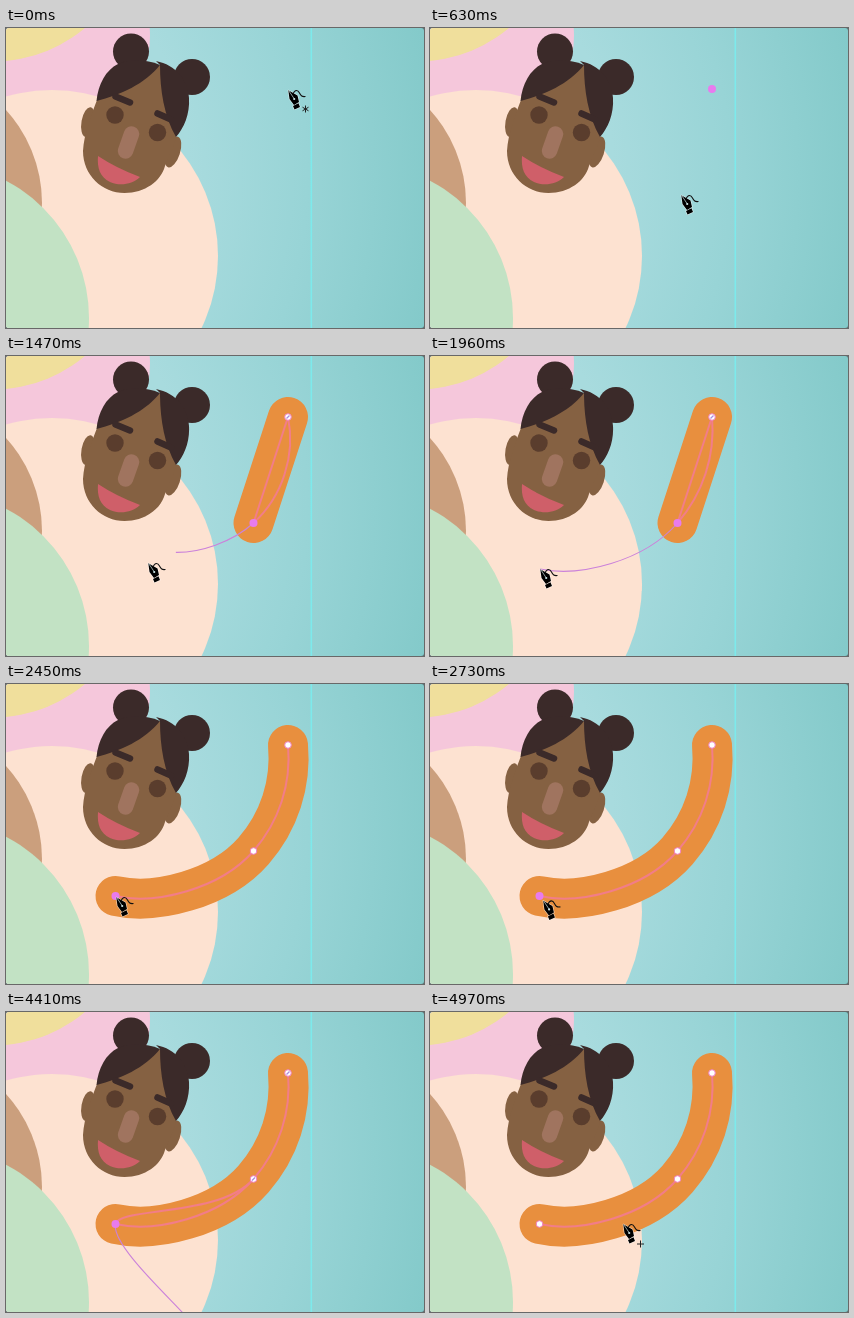
Recreate the animation shown at these times as an HTML page. Size 418x300 px, loop 5.04 s.

```html
<!DOCTYPE html>
<html lang="en">
<head>
<meta charset="utf-8">
<title>Drawing an arm with the curvature pen</title>
<style>
  html, body { margin: 0; width: 100%; height: 100%; overflow: hidden; background: #5b7375; }
  svg { display: block; width: 418px; height: 300px; border-radius: 3px; }
  .hair { fill: #3b2a29; }
  .skin { fill: #856142; }
  .eye { fill: #5a3d2d; }
  .brow { stroke: #3b2a29; stroke-width: 6.5; stroke-linecap: round; }
  .line { fill: none; stroke: #f27d88; stroke-width: 2; }
  .band { fill: none; stroke: #cb82da; stroke-width: 1.1; }
  #arm { fill: none; stroke: #e88f3e; stroke-width: 40; stroke-linecap: round; }
</style>
</head>
<body>
<svg viewBox="0 0 418 300">
  <defs>
    <radialGradient id="sea" gradientUnits="userSpaceOnUse" cx="-100" cy="150" r="535">
      <stop offset=".53" stop-color="#a8dbde"/>
      <stop offset=".75" stop-color="#98d4d6"/>
      <stop offset="1" stop-color="#84caca"/>
    </radialGradient>
  </defs>
  <rect width="418" height="300" fill="url(#sea)"/>
  <rect x="304.5" width="1.6" height="300" fill="#7deaec"/>

  <circle cx="46" cy="8" r="98" fill="#f5c7db"/>
  <circle cx="-13" cy="-109" r="142.600" fill="#f0df9c"/>
  <circle cx="46" cy="228" r="166" fill="#fde2d1"/>
  <circle cx="-102" cy="175" r="138" fill="#cb9f7d"/>
  <circle cx="-72" cy="290" r="155" fill="#c2e2c4"/>

  <g id="head">
    <circle class="hair" cx="125" cy="23.500" r="18"/>
    <circle class="hair" cx="186" cy="49" r="18"/>
    <ellipse class="skin" cx="82" cy="94" rx="6.500" ry="15" transform="rotate(10 82 94)"/>
    <ellipse class="skin" cx="167" cy="124" rx="7" ry="16" transform="rotate(18 167 124)"/>
    <path class="skin" d="M154 37C133 46 110 60 91 72C85 88 78 106 77 123C77 147 96 165 118.500 165C139 165 155 153 159 138C163 128 168 119 170 109C173 80 163 56 154 37Z"/>
    <path class="hair" d="M154 37C140 31 123 31 112 36C100 42 92 56 90.500 73C114 67 139 56 154 37Z"/>
    <path class="hair" d="M154 37C154 62 158 88 170 109C178 100 184 86 183 70C182 52 170 37 150 33Z"/>
    <path class="brow" d="M109.500 68.500L124 74.500M151.500 85.500L165 91.500"/>
    <circle class="eye" cx="109" cy="87" r="8.700"/>
    <circle class="eye" cx="151.500" cy="104.500" r="8.700"/>
    <path d="M125.500 106L119.500 123" stroke="#a0745f" stroke-width="15.500" stroke-linecap="round"/>
    <path d="M92 128Q110 140 134 149C126 157 113 158 104 154C94 149 91 140 92 128Z" fill="#cf5f69"/>
  </g>

  <path id="arm"/>
  <path id="spine" class="line"/>
  <path id="preview" class="line"/>
  <path id="band" class="band"/>
  <g id="nodes"></g>

  <g id="cursor">
    <path d="M.3.3L9.500 5.500L11 12L6 15L1.500 9ZM5 16L10.500 13.200L12 17L6.500 19.500Z" stroke="#fff" stroke-opacity=".65" stroke-width="1.200" paint-order="stroke" stroke-linejoin="round"/>
    <path d="M1 1L6 8.500" stroke="#cfe9ea" stroke-width=".7"/>
    <circle cx="6.200" cy="9" r="1.100" fill="#cfe9ea"/>
    <path d="M5 4C7-1 10 0 11.500 3S14 7 17.500 6.500" fill="none" stroke="#111" stroke-width="1.100"/>
    <g stroke="#222">
      <path id="plus" d="M14 20H21M17.500 16.500V23.500"/>
      <path id="star" d="M17.500 15.500V22.500M14.500 17.200L20.500 20.800M20.500 17.200L14.500 20.800"/>
    </g>
  </g>
</svg>

<script>
const LOOP = 5040, STEP = 70;
const CLICK = { first: 70, second: 980, third: 2310, cancel: 4620 };
const anchors = [[282, 61], [247.5, 167], [109.5, 212]];

// time, x, y, easing into this pose
const easeIn = p => p * p;
const easeOut = p => 1 - (1 - p) ** 2;
const smooth = p => p * p * (3 - 2 * p);
const route = [
  [0, 282, 62], [70, 282, 62], [630, 251, 167, smooth], [770, 247, 167, easeOut],
  [980, 247, 167], [1470, 142, 207, easeIn], [1820, 110, 213, easeOut],
  [2660, 110, 213], [3290, 195, 312, smooth], [4550, 185, 312],
  [4970, 193, 212, easeOut], [5040, 193, 212]
];

const $ = id => document.getElementById(id);
const add = (a, b, k = 1) => [a[0] + b[0] * k, a[1] + b[1] * k];
const sub = (a, b) => add(a, b, -1);
const dot = (a, b) => a[0] * b[0] + a[1] * b[1];
const size = v => Math.hypot(...v);
const unit = v => add([0, 0], v, 1 / (size(v) || 1));
const pt = p => p.map(n => n.toFixed(2)).join(' ');
const move = p => `M${pt(p)}`;
const cubic = (a, b, c) => `C${pt(a)} ${pt(b)} ${pt(c)}`;

function cursorAt(t) {
  const i = Math.max(1, route.findIndex(k => k[0] >= t));
  const [t0, x0, y0] = route[i - 1], [t1, x1, y1, ease = p => p] = route[i];
  const p = ease(Math.max(0, (t - t0) / (t1 - t0)));
  return [x0 + (x1 - x0) * p, y0 + (y1 - y0) * p];
}

// Direction of a smooth curve at b, close to the circle through a, b, c
function tangent(a, b, c) {
  const u = sub(b, a), v = sub(c, b);
  return unit(add(add([0, 0], unit(u), size(v)), unit(v), size(u)));
}

const mirror = (dir, chord) => sub(add([0, 0], chord, 2 * dot(chord, dir)), dir);

// Two arcs joined at b
function arcs(a, b, c) {
  const t = tangent(a, b, c), u = sub(b, a), v = sub(c, b);
  const du = size(u) * 0.35, dv = size(v);
  return [
    cubic(add(a, mirror(t, unit(u)), du), add(b, t, -du), b),
    cubic(add(b, t, dv * 0.35), add(c, mirror(t, unit(v)), -dv * 0.28), c)
  ];
}

// Preview of the last arc and the loose end beyond it
function tail(a, b, c, end) {
  const t1 = tangent(a, b, c), t2 = tangent(b, c, end);
  const d = size(sub(c, b)), v = sub(end, c);
  return [
    cubic(add(b, t1, d * 0.35), add(c, t2, -d * 0.12), c),
    cubic(add(c, t2, size(v) * 0.18), add(end, v, -0.2), end)
  ];
}

function node(p, chosen, marked) {
  const [x, y] = p;
  if (chosen) return `<circle cx="${x}" cy="${y}" r="4" fill="#e87bee"/>`;
  const mark = marked
    ? `<path d="M${x - 1.5} ${y + 1.5}l3-3" stroke="#a98be0" stroke-width="1.3"/>` : '';
  return `<circle cx="${x}" cy="${y}" r="3.3" fill="#fff" stroke="#ee7fc0"/>${mark}`;
}

function draw(t) {
  const [a, b, c] = anchors;
  const count = (t >= CLICK.first) + (t >= CLICK.second) + (t >= CLICK.third);
  const done = t >= CLICK.cancel;
  const end = cursorAt(Math.max(0, t - STEP));
  const loose = count > 1 && !done && size(sub(end, anchors[count - 1])) > 5;

  const shape = count === 3 ? move(a) + arcs(a, b, c).join('')
    : count === 2 ? move(a) + `L${pt(b)}` : '';
  let preview = '', band = '';
  if (loose) {
    const [inner, outer] = count === 2 ? arcs(a, b, end) : tail(a, b, c, end);
    preview = move(anchors[count - 2]) + inner;
    band = move(anchors[count - 1]) + outer;
  }
  $('arm').setAttribute('d', shape);
  $('spine').setAttribute('d', shape);
  $('preview').setAttribute('d', preview);
  $('band').setAttribute('d', band);
  $('nodes').innerHTML = anchors.slice(0, count)
    .map((p, i) => node(p, !done && i === count - 1, loose)).join('');

  $('cursor').setAttribute('transform', `translate(${pt(cursorAt(t))})`);
  $('star').style.display = t < CLICK.first ? '' : 'none';
  $('plus').style.display = done ? '' : 'none';
}

const start = performance.now();
function tick() {
  const t = (performance.now() - start) % LOOP;
  draw(Math.floor(t / STEP) * STEP);
  requestAnimationFrame(tick);
}
draw(0);
requestAnimationFrame(tick);
</script>
</body>
</html>
```
